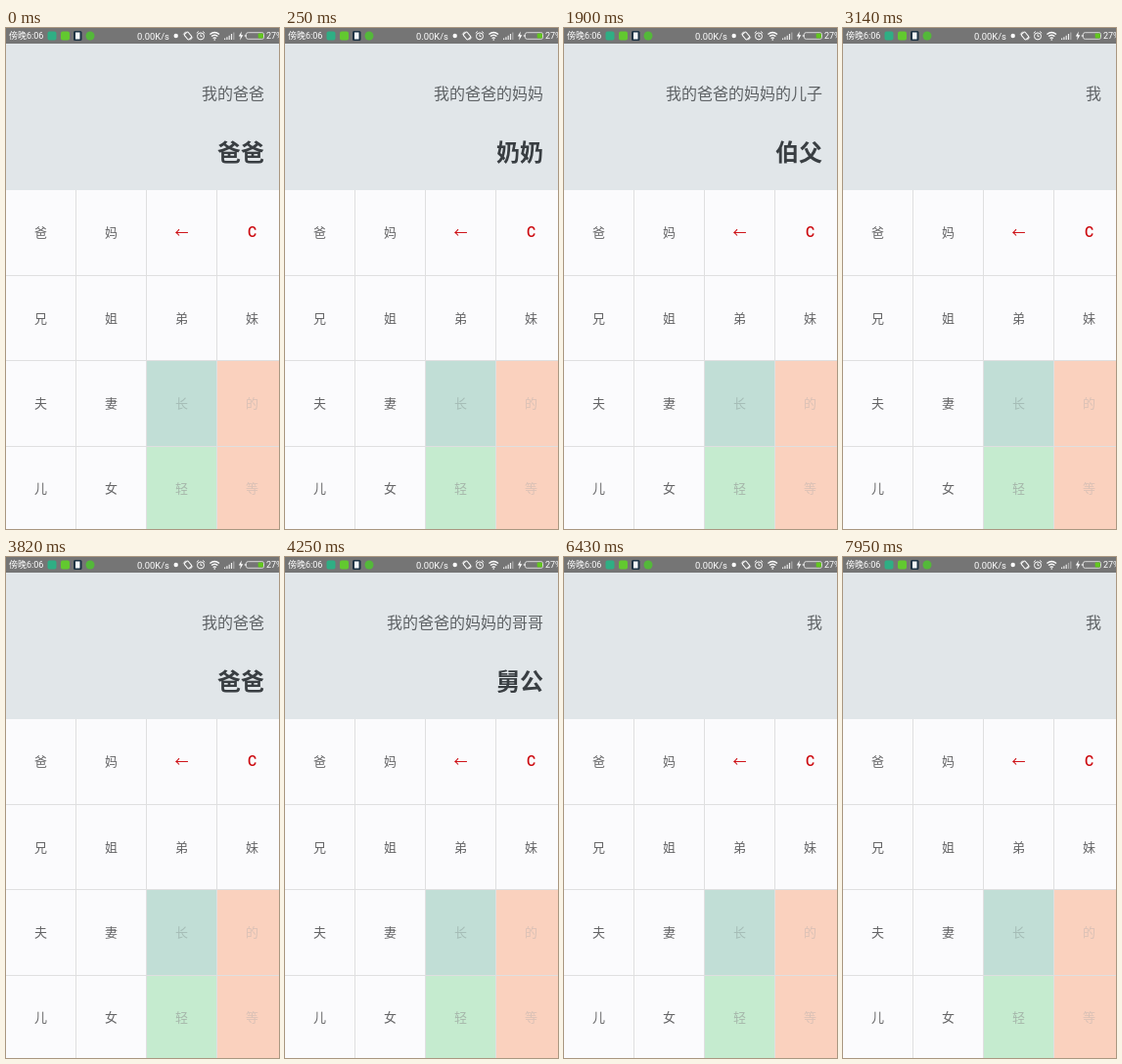
Write an HTML page that moves like this. It is 279 px wide and 513 px high and loops after 8 s.

```html
<!DOCTYPE html>
<html lang="zh-CN">
<head>
<meta charset="utf-8">
<title>亲戚计算器</title>
<style>
  html, body { margin: 0; width: 100%; height: 100%; overflow: hidden; }
  body {
    position: relative;
    background: #fbfbfd;
    font-family: "Noto Sans CJK SC", "Noto Sans CJK", sans-serif;
  }
  #stage { position: absolute; left: 0; top: 0; width: 279px; height: 513px; overflow: hidden; }
  #stage > *, .key { position: absolute; }
  #keys { left: 0; top: 0; }
  #bar { left: 0; top: 0; font: 9px Roboto, "Noto Sans CJK SC", sans-serif; }
  #screen { left: 0; top: 16px; width: 279px; height: 150px; background: #e1e6e9; }
  #chain, #answer { right: 15px; white-space: pre; }
  #chain { top: 54px; font-size: 16px; line-height: 24px; color: #5e6265; }
  #answer { top: 108px; font-size: 24px; line-height: 36px; font-weight: 700; color: #393e42; }

  .key {
    box-sizing: border-box;
    width: 72px;
    height: 88px;
    border: solid #dfdfe0;
    border-width: 1px 1px 0 0;
    font-size: 13px;
    text-align: center;
    color: #656567;
  }
  .key.red { color: #cc0a10; font-size: 14px; }
  .key.latin { padding-top: 1px; font-family: Roboto, sans-serif; font-weight: 500; }
  .key.long { background: #c1ded6; color: #a5bcb6; }
  .key.young { background: #c5ebcf; color: #a6b7ab; }
  .key.wide { background: #fad1be; color: #dac1b6; }
  .ask .plain { background: #ececec; color: #d7d7d7; }
  .ask .long { background: #389e84; border-color: transparent; color: #174a3d; }
  .ask .young { background: #4ccd6b; border-color: transparent; color: #1c4c28; }
</style>
</head>
<body>
<div id="stage">
  <div id="keys"></div>
  <div id="screen"></div>
  <svg id="bar" width="279" height="16" fill="#fff">
    <rect width="279" height="16" fill="#757575"/>
    <text x="3" y="11.3">傍晚6:06</text>
    <rect x="42.5" y="3.5" width="9" height="9" rx="2" fill="#2fae84"/>
    <rect x="56" y="3.5" width="9" height="9" rx="2" fill="#62c92f"/>
    <rect x="69" y="3" width="8.5" height="10" rx="1.5" fill="#1d3344"/>
    <rect x="71" y="4.5" width="4.5" height="7" fill="#f4f8fa"/>
    <circle cx="86" cy="8" r="4.5" fill="#54b83a"/>
    <text x="134" y="11.5" font-size="9.4">0.00K/s</text>
    <circle cx="173.7" cy="8" r="2.2"/>
    <g fill="none" stroke="#fff">
      <rect x="183.5" y="4.5" width="5" height="7" rx="1" transform="rotate(-40 186 8)"/>
      <path d="M181.3 6.5l2.5-2.8M190.7 9.5l-2.5 2.8"/>
      <circle cx="199" cy="8.4" r="3.5"/>
      <path d="M199 6.4v2.3h1.6M194.8 5.4l2-1.9M203.2 5.4l-2-1.9"/>
      <path d="M208.4 6.5q4.8-4 9.6 0M210 8.6q3.2-2.8 6.4 0M211.6 10.5q1.6-1.3 3.2 0" stroke-width="1.3"/>
      <g stroke-opacity=".8">
        <rect x="245.5" y="4.7" width="18" height="6.6" rx="1.8" stroke-width=".9"/>
        <path d="M244.3 6.8v2.4"/>
      </g>
    </g>
    <circle cx="213.2" cy="12" r=".8"/>
    <path d="M223 10.5h1.2V12H223zM225.3 9.3h1.2V12h-1.2zM227.6 7.8h1.2V12h-1.2z" fill-opacity=".85"/>
    <path id="signal" d="M229.9 6h1.2v6h-1.2z"/>
    <path d="M232.2 4.5h1.2V12h-1.2z" fill-opacity=".4"/>
    <path d="M240.8 3.6l-3 5h2l-.7 3.8 3.2-5.1h-2z"/>
    <rect x="257.7" y="5.4" width="5.2" height="5.2" rx=".8" fill="#62c81e"/>
    <text x="266" y="11.3">27%</text>
  </svg>
  <div id="chain"></div>
  <div id="answer"></div>
</div>
<script>
  const $ = id => document.getElementById(id);
  const LOOP = 8000, SIGNAL_DROP = 7950;

  const father = ['我的爸爸', '爸爸'];
  const granny = ['我的爸爸的妈妈', '奶奶'];
  const me = ['我', ''];
  const son = '我的爸爸的妈妈的儿子';

  // [start ms, [chain, answer]]
  const steps = [
    [0, father],
    [250, granny],
    [650, [son, '比 爸爸 年长/年轻？']],
    [1900, [son, '伯父']],
    [3140, me],
    [3820, father],
    [3940, granny],
    [4250, ['我的爸爸的妈妈的哥哥', '舅公']],
    [5870, granny],
    [6150, father],
    [6430, me]
  ];

  const kinds = { '←': 'red', C: 'red latin', 长: 'long', 轻: 'young', 的: 'wide', 等: 'wide' };
  [...'爸妈←C兄姐弟妹夫妻长的儿女轻等'].forEach((label, i) => {
    const key = document.createElement('div');
    const row = i >> 2;
    const top = Math.round(165.4 + row * 87.4);
    const middle = Math.floor(208.9 + row * 87.2);
    key.className = `key ${kinds[label] || 'plain'}`;
    key.textContent = label;
    key.style.left = (i % 4) * 72 + 'px';
    key.style.top = top + 'px';
    key.style.lineHeight = 2 * (middle - top) - 1 + 'px';
    $('keys').append(key);
  });

  let shown;
  function draw() {
    const t = performance.now() % LOOP;
    const step = steps.findLast(([start]) => t >= start);
    if (step !== shown) {
      shown = step;
      [$('chain').textContent, $('answer').textContent] = step[1];
      $('keys').classList.toggle('ask', step[1][1].includes('/'));
    }
    $('signal').style.fillOpacity = t >= SIGNAL_DROP ? .4 : .9;
    requestAnimationFrame(draw);
  }
  draw();
</script>
</body>
</html>
```
